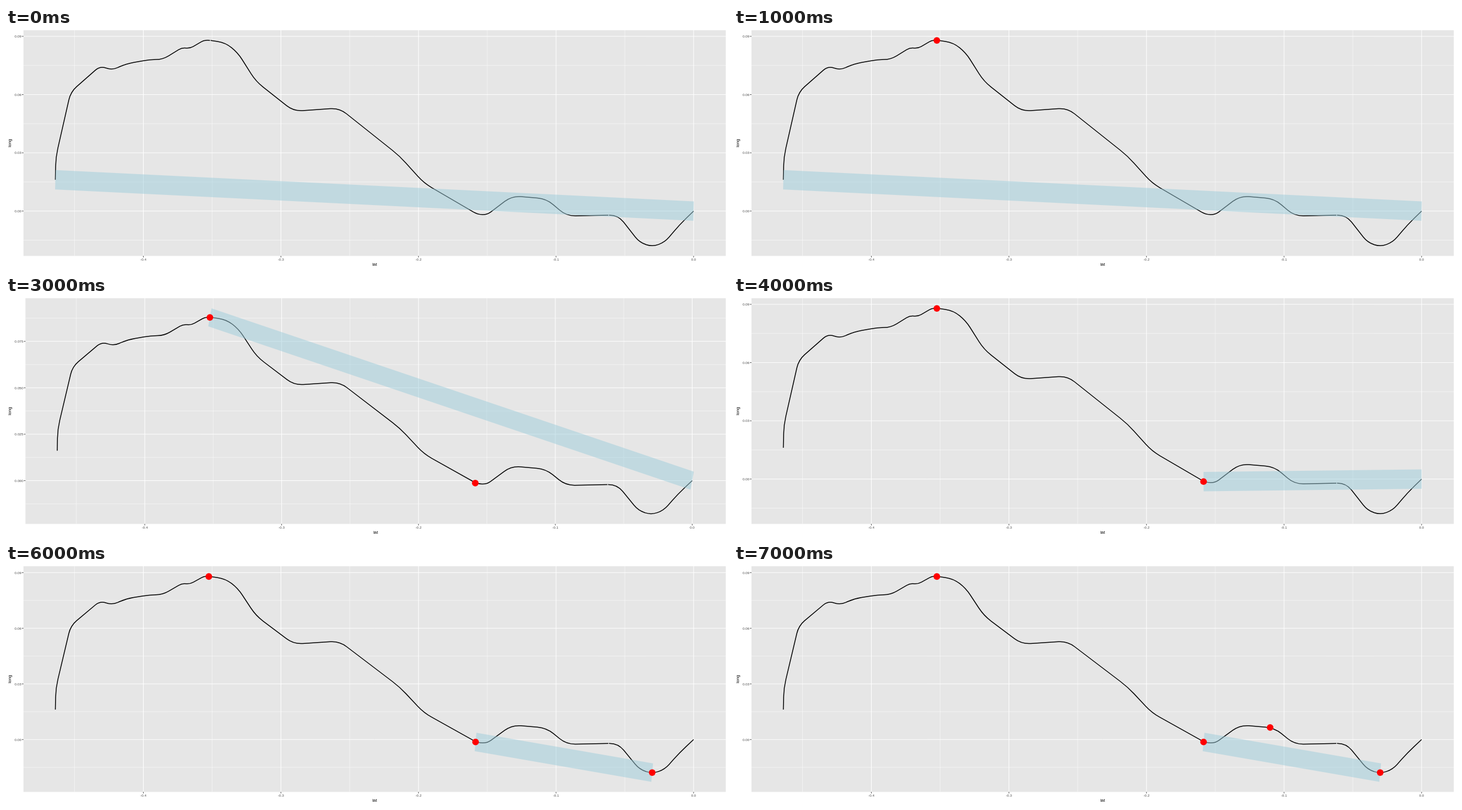
Recreate the animation shown at these times as an HTML page with a canvas. Size 1280 px wide and 427 px high, loop 8 s.

```html
<!DOCTYPE html>
<html>
<head>
<meta charset="utf-8">
<style>
  html, body { margin: 0; overflow: hidden; background: #fff; }
  canvas { display: block; }
</style>
</head>
<body>
<canvas id="stage" width="1280" height="427"></canvas>
<script>
const ctx = document.getElementById('stage').getContext('2d');
const PANEL = { top: 4, right: 1276, bottom: 405.5 };

// Axis ranges: panel edge, origin and scale of both axes, grid step
const wide = { left: 31, x0: 1219, kx: 2438.75, y0: 325.7, ky: 3454, step: 0.03, digits: 2 };
const fine = { left: 34.5, x0: 1216.5, kx: 2426.25, y0: 328.5, ky: 3304, step: 0.025, digits: 3 };
const tall = { ...wide, y0: 312.3, ky: 3300 };

// The track is a polyline with rounded corners; corners are given in the wide view
const toData = ([x, y]) => [(x - wide.x0) / wide.kx, (wide.y0 - y) / wide.ky];
const track = [
  [87.5, 270], [88.3, 230], [113, 121], [120, 109], [167, 67.5], [188, 75], [213, 63.5],
  [254, 56.4], [278, 55.8], [312, 35], [326, 36.4], [350, 22.3], [359, 21.6], [389, 26.2],
  [411, 44], [443, 95], [510, 148], [591, 142.5], [698, 228], [741, 276], [836, 331.6],
  [853, 332.3], [897, 298.7], [958, 304], [994, 334.6], [1085, 332.6], [1123, 381.3],
  [1146, 389.3], [1168, 381], [1194, 350.3], [1219, 325.7]
].map(toData);
const gaps = [[362.2, 22.5], [1068.5, 332.7]].map(toData);

const start = track[0], end = [0, 0];
const peak = [-0.3524, 0.0879], dip = [-0.1585, -0.0013];
const trough = [-0.0301, -0.0178], bump = [-0.1101, 0.0065];
const marks = [peak, dip, trough, bump];

// Each step shows a band for one second, then marks its farthest point
const steps = [[wide, start, end], [fine, peak, end], [wide, dip, end], [tall, dip, trough]];

function line(x1, y1, x2, y2, color, width) {
  ctx.strokeStyle = color;
  ctx.lineWidth = width;
  ctx.beginPath();
  ctx.moveTo(x1, y1);
  ctx.lineTo(x2, y2);
  ctx.stroke();
}

function text(str, x, y, size, align, color) {
  ctx.font = size + 'px "Liberation Sans", Arial, sans-serif';
  ctx.textAlign = align;
  ctx.fillStyle = color;
  ctx.fillText(str, x, y);
}

function drawAxes({ left, x0, kx, y0, ky, step, digits }) {
  const { top, right, bottom } = PANEL;
  ctx.fillStyle = '#fff';
  ctx.fillRect(0, 0, 1280, 427);
  ctx.fillStyle = '#e6e6e6';
  ctx.fillRect(left, top, right - left, bottom - top);
  for (const minor of [true, false]) {
    const width = minor ? 0.5 : 1;
    for (let i = 0; i < 5; i++) {
      const x = x0 - kx * 0.1 * (minor ? i + 0.5 : i);
      line(x, top, x, bottom, '#fff', width);
      if (minor) continue;
      line(x, bottom, x, bottom + 2.7, '#333', 0.9);
      text((i ? '-0.' : '0.') + i, x, 414.2, 6.2, 'center', '#4d4d4d');
    }
    for (let i = 0; i < 5; i++) {
      const value = step * (minor ? i - 0.5 : i);
      const y = y0 - value * ky;
      if (y < top) continue;
      line(left, y, right, y, '#fff', width);
      if (minor) continue;
      line(left - 2.7, y, left, y, '#333', 0.9);
      text(value.toFixed(digits), left - 3.8, y + 2.2, 6.2, 'right', '#4d4d4d');
    }
  }
  text('lat', (left + right) / 2, 423.3, 7.8, 'center', '#000');
  ctx.save();
  ctx.translate(9.3, (top + bottom) / 2);
  ctx.rotate(-Math.PI / 2);
  text('long', 0, 0, 7.8, 'center', '#000');
  ctx.restore();
}

function drawTrack(points) {
  const distance = (p, q) => Math.hypot(q[0] - p[0], q[1] - p[1]);
  const toward = (p, q, length) => {
    const k = length / distance(p, q);
    return [p[0] + (q[0] - p[0]) * k, p[1] + (q[1] - p[1]) * k];
  };
  ctx.beginPath();
  ctx.moveTo(...points[0]);
  for (let i = 1; i < points.length - 1; i++) {
    const [a, b, c] = points.slice(i - 1, i + 2);
    const round = Math.min(16, distance(a, b) / 2, distance(b, c) / 2);
    ctx.lineTo(...toward(b, a, round));
    ctx.quadraticCurveTo(...b, ...toward(b, c, round));
  }
  ctx.lineTo(...points[points.length - 1]);
  ctx.strokeStyle = '#000';
  ctx.lineWidth = 1.5;
  ctx.stroke();
}

function drawBand(a, b, place) {
  const dx = b[0] - a[0], dy = b[1] - a[1];
  const k = 0.005 / Math.hypot(dx, dy);
  const corner = (p, side) => place([p[0] - dy * k * side, p[1] + dx * k * side]);
  ctx.beginPath();
  for (const c of [corner(a, 1), corner(b, 1), corner(b, -1), corner(a, -1)]) ctx.lineTo(...c);
  ctx.fillStyle = 'rgba(158,206,220,0.5)';
  ctx.fill();
}

function draw(time) {
  const second = Math.floor(time / 1000) % (steps.length * 2);
  const [view, from, to] = steps[Math.floor(second / 2)];
  const place = ([x, y]) => [view.x0 + x * view.kx, view.y0 - y * view.ky];
  drawAxes(view);
  drawTrack(track.map(place));
  for (const [x, y] of gaps.map(place)) line(x, y - 1.5, x, y + 1.5, '#e6e6e6', 1.2);
  drawBand(from, to, place);
  ctx.fillStyle = '#f00';
  for (const mark of marks.slice(0, Math.ceil(second / 2))) {
    ctx.beginPath();
    ctx.arc(...place(mark), 5.9, 0, Math.PI * 2);
    ctx.fill();
  }
}

const begin = performance.now();
function tick() {
  draw(performance.now() - begin);
  requestAnimationFrame(tick);
}
tick();
</script>
</body>
</html>
```
